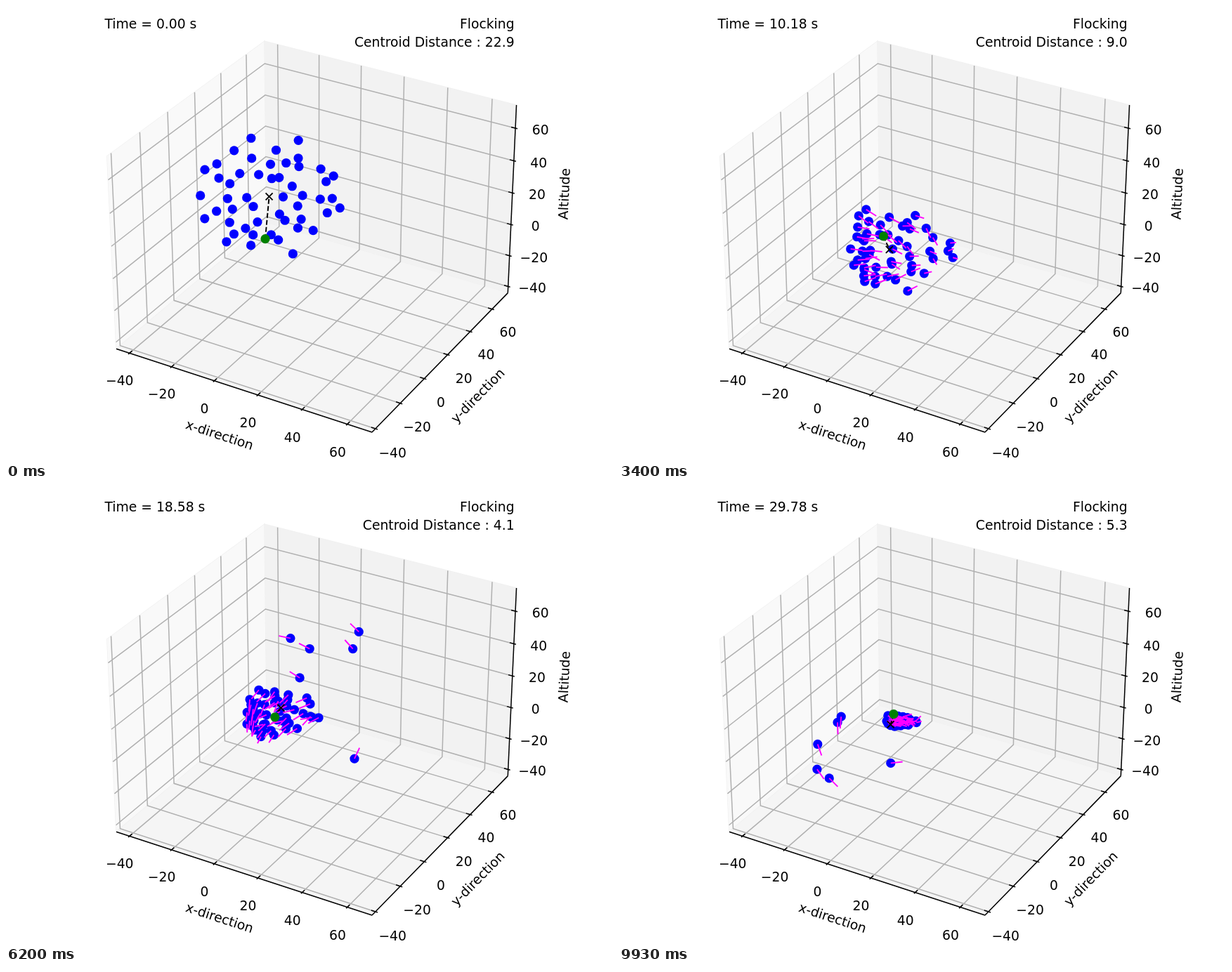
An HTML page with a canvas for the animation above (9.99 s loop, 864x648 px).

```html
<!DOCTYPE html>
<html>
<head>
<meta charset="utf-8">
<style>
  html, body { margin: 0; height: 100%; overflow: hidden; background: #fff; }
  canvas { display: block; }
</style>
</head>
<body>
<canvas id="stage" width="864" height="648"></canvas>
<script>
const ctx = document.getElementById('stage').getContext('2d');
const LOOP = 9990, LAST = 149, BIRDS = 50, RAD = Math.PI / 180;

// Axes box: half sizes, data centre and data scale for x, y, z.
const HALF = [.5952, .5952, .4464];
const CENTER = [12.2, 16, 14.9], SCALE = [.01016, .01013, .00755];
const BACK = [-1, 1, -1];
const AXES = [
  { name: 'x-direction', edge: [0, -1, -1], tick: 1, drop: 9 },
  { name: 'y-direction', edge: [1, 0, -1], tick: 0, drop: 9 },
  { name: 'Altitude', edge: [1, 1, 0], tick: 0, drop: 7 }];

// Birds that leave the flock: orbit angle, turn per frame, radius, radius loss.
const STRAYS = [[78, 2.45, 120, 0], [63, 2.9, 115, 0], [42, 2.5, 153, 1.5],
  [46, 2.3, 176, 2], [58, 3.9, 72, .2], [-25, 4, 128, .45]];

const DISTANCE = [[0, 22.9], [30, 2.7], [51, 9], [67, 11.6], [93, 4.1], [116, 3.5], [149, 5.3]];

const mix = (a, b, u) => a + (b - a) * u;
const clamp = u => Math.min(1, Math.max(0, u));
const smooth = u => (u = clamp(u)) * u * (3 - 2 * u);
const random = seed => Math.abs(Math.sin(seed * 12.9898) * 43758.5453) % 1;

// Perspective camera at elevation 30, azimuth -60; input in units of the half box.
function project(signs) {
  const [x, y, z] = signs.map((s, i) => s * HALF[i]);
  const zoom = 3502.7 / (10 - (.433 * x - .75 * y + .5 * z));
  return [440.8 + zoom * (.866 * x + .5 * y), 315.2 - zoom * (-.25 * x + .433 * y + .866 * z)];
}

const replace = (list, i, value) => list.map((v, j) => j === i ? value : v);

function line(color, width, ...points) {
  ctx.strokeStyle = color;
  ctx.lineWidth = width;
  ctx.beginPath();
  for (const [x, y] of points) ctx.lineTo(x, y);
  ctx.stroke();
}

function dot([x, y], color) {
  ctx.fillStyle = color;
  ctx.beginPath();
  ctx.arc(x, y, 6.6, 0, 2 * Math.PI);
  ctx.fill();
}

function text(str, x, y, align = 'center', angle = 0, shift = 0) {
  ctx.save();
  ctx.translate(x, y);
  ctx.rotate(angle);
  ctx.font = '18.75px "DejaVu Sans", sans-serif';
  ctx.fillStyle = '#000';
  ctx.textAlign = align;
  ctx.fillText(str, 0, shift);
  ctx.restore();
}

function drawPane(axis, color) {
  const [j, k] = [0, 1, 2].filter(i => i !== axis);
  const corners = [[-1, -1], [-1, 1], [1, 1], [1, -1], [-1, -1]]
    .map(([a, b]) => project(replace(replace(BACK, j, a), k, b)));
  line('#f0f0f0', 1.5, ...corners);
  ctx.fillStyle = color;
  ctx.fill();
}

function eachTick(draw) {
  AXES.forEach((spec, axis) => {
    for (let value = -40; value <= 60; value += 20)
      draw(spec, axis, (value - CENTER[axis]) * SCALE[axis] / HALF[axis], value);
  });
}

function drawAxes() {
  ['#f9f9f9', '#f2f2f2', '#f5f5f5'].forEach((color, axis) => drawPane(axis, color));
  eachTick((spec, axis, p) => {
    const back = replace(BACK, axis, p);
    const [j, k] = [0, 1, 2].filter(i => i !== axis);
    line('#b0b0b0', 1.5, ...[replace(back, j, -back[j]), back, replace(back, k, -back[k])].map(project));
  });
  AXES.forEach(({ name, edge }, axis) => {
    const a = project(replace(edge, axis, -1)), b = project(replace(edge, axis, 1));
    line('#000', 1.5, a, b);
    const [x, y] = project(edge.map(s => s * 1.278));
    text(name, x, y, 'center', Math.atan2(b[1] - a[1], b[0] - a[0]), 5);
  });
  eachTick(({ edge, tick, drop }, axis, p, value) => {
    const foot = replace(edge, axis, p);
    line('#000', 1.5, ...[1.016, .968].map(s => project(replace(foot, tick, foot[tick] * s))));
    const [x, y] = project(replace(edge.map(s => s * 1.128), axis, p));
    text((value < 0 ? '\u2212' : '') + Math.abs(value), x, y + drop, 'center', 0, 6.8);
  });
}

const goalAt = frame => [369 + 22 * frame / LAST, 331.7 - 11 * frame / LAST];

// The flock falls towards the goal, then circles it ever faster while it shrinks.
function birdAt(i, frame) {
  const u = frame - 30, [gx, gy] = goalAt(frame);
  const radius = Math.sqrt((i + .5) / BIRDS), spin = i * 2.4;
  const qx = radius * Math.cos(spin) + .2 * (random(i + 1) - .5);
  const qy = radius * Math.sin(spin) + .2 * (random(i + 99) - .5);
  const phase = (3 * u + .032 * u * u) * RAD + random(i + 50) - .5;
  const orbit = 18 - .08 * u, settle = smooth(frame / 30), near = 1 - frame / 250;
  const skew = .35 * clamp(frame / 30) * (qx * qx - .25);

  let x = gx + mix(6, 14 * near - orbit * Math.cos(phase), settle) + (106 - .56 * frame) * (qx + skew);
  let y = gy + mix(-60, 4 * near + orbit * Math.sin(phase), settle) + (84 - .5 * frame) * qy;
  let hx = Math.sin(phase) - .6 * qx, hy = Math.cos(phase) - .4 * qy;

  const stray = STRAYS[i - BIRDS + STRAYS.length];
  if (stray) {
    const [angle, turn, far, loss] = stray;
    const a = (angle + turn * (frame - 93)) * RAD, away = smooth((frame - 45) / 35);
    const r = far - loss * Math.max(0, frame - 93);
    x = mix(x, 380 + r * Math.cos(a), away);
    y = mix(y, 330 - r * Math.sin(a), away);
    hx = mix(hx, -Math.sin(a), away);
    hy = mix(hy, -Math.cos(a), away);
  }
  const reach = 17 * clamp(frame / 8) / Math.max(1, Math.hypot(hx, hy));
  return { at: [x, y], tip: [x + hx * reach, y + hy * reach] };
}

function distanceAt(frame) {
  const k = Math.max(1, DISTANCE.findIndex(([f]) => f >= frame));
  const [[f0, d0], [f1, d1]] = [DISTANCE[k - 1], DISTANCE[k]];
  return mix(d0, d1, (frame - f0) / (f1 - f0));
}

function drawFlock(frame) {
  const birds = Array.from({ length: BIRDS }, (_, i) => birdAt(i, frame));
  const [cx, cy] = [0, 1].map(d => birds.reduce((sum, b) => sum + b.at[d], 0) / BIRDS);
  const goal = goalAt(frame);

  for (const b of birds) dot(b.at, '#00f');
  for (const b of birds) line('#f0f', 1.9, b.at, b.tip);
  ctx.setLineDash([7, 3]);
  line('#000', 1.9, goal, [cx, cy]);
  ctx.setLineDash([]);
  for (const s of [-5, 5]) line('#000', 1.9, [cx - 5, cy - s], [cx + 5, cy + s]);
  dot(goal, '#008000');

  text(`Time = ${Math.max(0, frame * .2 - .02).toFixed(2)} s`, 140.4, 32.4, 'left');
  text('Flocking', 723.6, 32.4, 'right');
  text(`Centroid Distance : ${distanceAt(frame).toFixed(1)}`, 723.6, 58.3, 'right');
}

const began = performance.now();
function draw() {
  const t = (performance.now() - began) % LOOP;
  let frame = LAST;
  while (frame > 0 && Math.round(frame * 20 / 3) * 10 > t) frame--;
  ctx.clearRect(0, 0, 864, 648);
  drawAxes();
  drawFlock(frame);
  requestAnimationFrame(draw);
}
draw();
</script>
</body>
</html>
```
